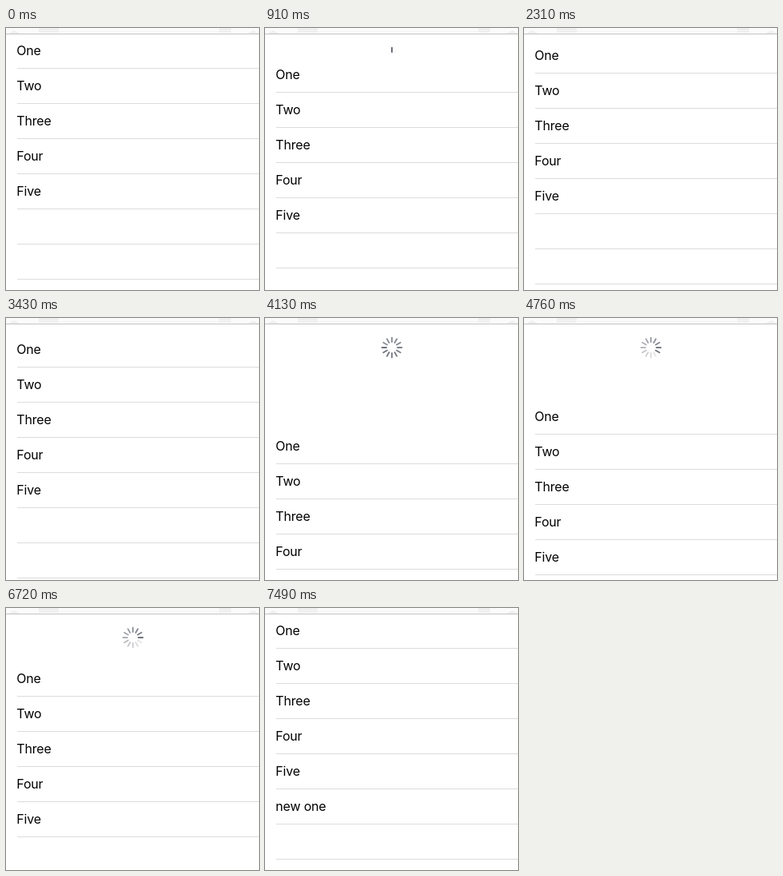
An HTML page that plays this animation: 317 by 328 pixels, repeating every 8260 ms.

```html
<!DOCTYPE html>
<html lang="en">
<head>
<meta charset="utf-8">
<title>Pull to refresh</title>
<style>
  html, body { margin: 0; width: 100%; height: 100%; overflow: hidden; background: #fff; }
  svg { display: block; width: 317px; height: 328px; }
  text { font: 16px Inter, sans-serif; letter-spacing: -0.18px; fill: #000; }
  #spinner line { stroke: #5b5e6b; stroke-width: 1.8; stroke-linecap: round; }
</style>
</head>
<body>
<svg viewBox="0 0 317 328">
  <g id="spinner"></g>
  <g id="list"><rect y="8" width="317" height="400" fill="#fff"/></g>
  <g id="navbar">
    <rect width="317" height="7" fill="#fbfbfb"/>
    <path d="M3 7L10 3L18 7ZM302 7L310 3L317 7Z" fill="#efefef"/>
    <path d="M41 1.5H66M41 4.5H66M267 1.5H282M267 4.5H282" stroke="#ececec" stroke-width="2"/>
    <path d="M67 4.5H267" stroke="#f3f3f3"/>
    <path d="M0 7.5H317" stroke="#c4c4c4"/>
  </g>
</svg>
<script>
const LOOP = 8260, FRAME = 70, ROW = 44, TICKS = 12, REST = 60;
const labels = ['One', 'Two', 'Three', 'Four', 'Five', 'new one', ''];
const spinner = document.getElementById('spinner');
const list = document.getElementById('list');

function add(parent, tag, attrs) {
  const node = document.createElementNS('http://www.w3.org/2000/svg', tag);
  for (const name in attrs) node.setAttribute(name, attrs[name]);
  return parent.appendChild(node);
}

const texts = labels.map((label, i) => {
  add(list, 'rect', { x: 14, y: 50 + i * ROW, width: 303, height: 1, fill: '#dcdcdc' });
  const text = add(list, 'text', { x: 13.3, y: 34 + i * ROW });
  text.textContent = label;
  return text;
});
const ticks = Array.from({ length: TICKS }, (_, i) =>
  add(spinner, 'line', { y1: -6.9, y2: -12.4, transform: `rotate(${i * 360 / TICKS})` }));

const clamp = x => Math.min(1, Math.max(0, x));
const progress = (t, from, to) => clamp((t - from) / (to - from));
const smooth = p => p * p * (3 - 2 * p);
const drag = (t, from, to, distance) =>
  11 + (distance - 11) * Math.sin(progress(t, from, to) * Math.PI / 2);

// Critically damped return, from 1 to 0
function spring(t, release) {
  const x = Math.max(0, t - release) * 0.0134;
  return (1 + x) * Math.exp(-x);
}

function pullOffset(t) {
  if (t < 840) return 0;
  if (t < 1990) return drag(t, 840, 1260, 85);
  if (t < 3430) return 85 * spring(t, 1990);
  if (t < 4630) return drag(t, 3430, 4200, 133);
  if (t < 7210) return REST + 73 * spring(t, 4630);
  return REST * (1 - smooth(progress(t, 7140, 7490)));
}

function draw(t) {
  const offset = Math.round(pullOffset(t));
  list.setAttribute('transform', `translate(0 ${offset})`);
  texts[5].style.display = t >= 7210 ? '' : 'none';

  const spinning = t >= 4060;
  const revealed = progress(offset, 25, 83) * TICKS;
  const head = Math.floor((t - 6011.25) / 87.5) + 7;
  const contrast = progress(t, 4060, 4340);
  ticks.forEach((tick, i) => {
    const age = ((head - i) % TICKS + TICKS) % TICKS;
    tick.style.opacity = spinning
      ? 0.88 - contrast * 0.72 * age / (TICKS - 1)
      : clamp(revealed - i);
  });
  const remaining = 1 - progress(t, 7140, 7490);
  spinner.setAttribute('transform', `translate(159 37) scale(${remaining})`);
  spinner.style.opacity = remaining;
}

const start = performance.now();
function tick(now) {
  const t = Math.max(0, now - start) % LOOP;
  draw(Math.floor(t / FRAME) * FRAME);
  requestAnimationFrame(tick);
}
draw(0);
requestAnimationFrame(tick);
</script>
</body>
</html>
```
